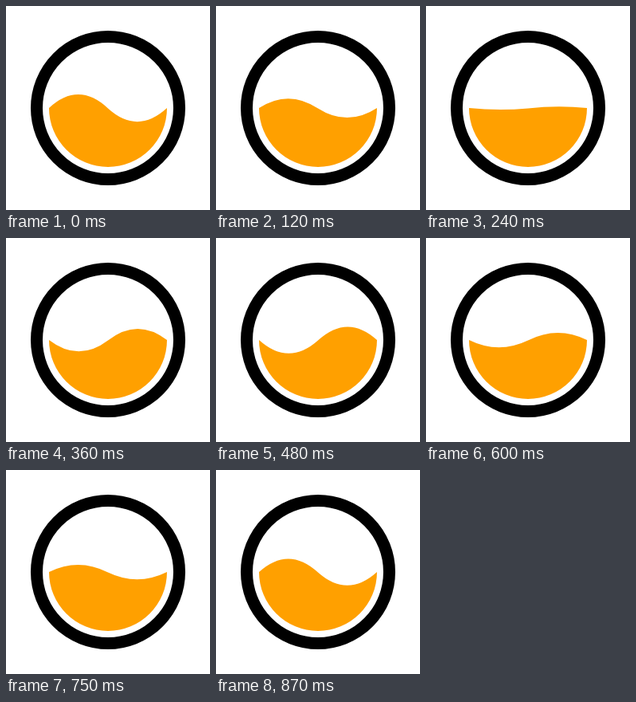
Recreate the animation shown at these times as an HTML page. Size 256 px wide and 256 px high, loop 0.9 s.

```html
<!DOCTYPE html>
<html lang="en">
<head>
<meta charset="utf-8">
<title>Liquid loader</title>
<style>
  html, body { margin: 0; width: 100%; height: 100%; overflow: hidden; background: #fff; }
  svg { display: block; width: 100vw; height: 100vh; }
</style>
</head>
<body>
<svg viewBox="0 0 256 256">
  <circle cx="128" cy="128" r="89.5" fill="none" stroke="#000" stroke-width="15"/>
  <path id="liquid" fill="#ffa000"/>
</svg>
<script>
  const LOOP = 900, STEPS = 30, HEIGHT = 17;
  const liquid = document.getElementById('liquid');

  // Cubic ease-in-out with control points (.42, 0) and (.58, 1)
  function easeInOut(x) {
    let lo = 0, hi = 1, t = 0.5;
    for (let i = 0; i < 24; i++) {
      t = (lo + hi) / 2;
      const u = 1 - t;
      const bx = 1.26 * t * u * u + 1.74 * t * t * u + t * t * t;
      if (bx < x) lo = t; else hi = t;
    }
    return t * t * (3 - 2 * t);
  }

  // Lower half disc whose surface is one full wave
  function shape(height) {
    const peak = (128 - 2 * height).toFixed(2);
    const dip = (128 + 2 * height).toFixed(2);
    return `M54 128 Q91 ${peak} 128 128.5 Q165 ${dip} 202 128 A74 74 0 0 1 54 128 Z`;
  }

  const frames = Array.from({ length: STEPS + 1 }, (_, i) => {
    const half = 1 - Math.abs(1 - 2 * i / STEPS);
    const p = i * 2 <= STEPS ? easeInOut(half) : 1 - easeInOut(1 - half);
    return {
      d: `path("${shape(HEIGHT * (1 - 2 * p))}")`,
      offset: i / STEPS,
      easing: 'step-end'
    };
  });

  liquid.setAttribute('d', shape(HEIGHT));
  liquid.animate(frames, { duration: LOOP, iterations: Infinity });
</script>
</body>
</html>
```
